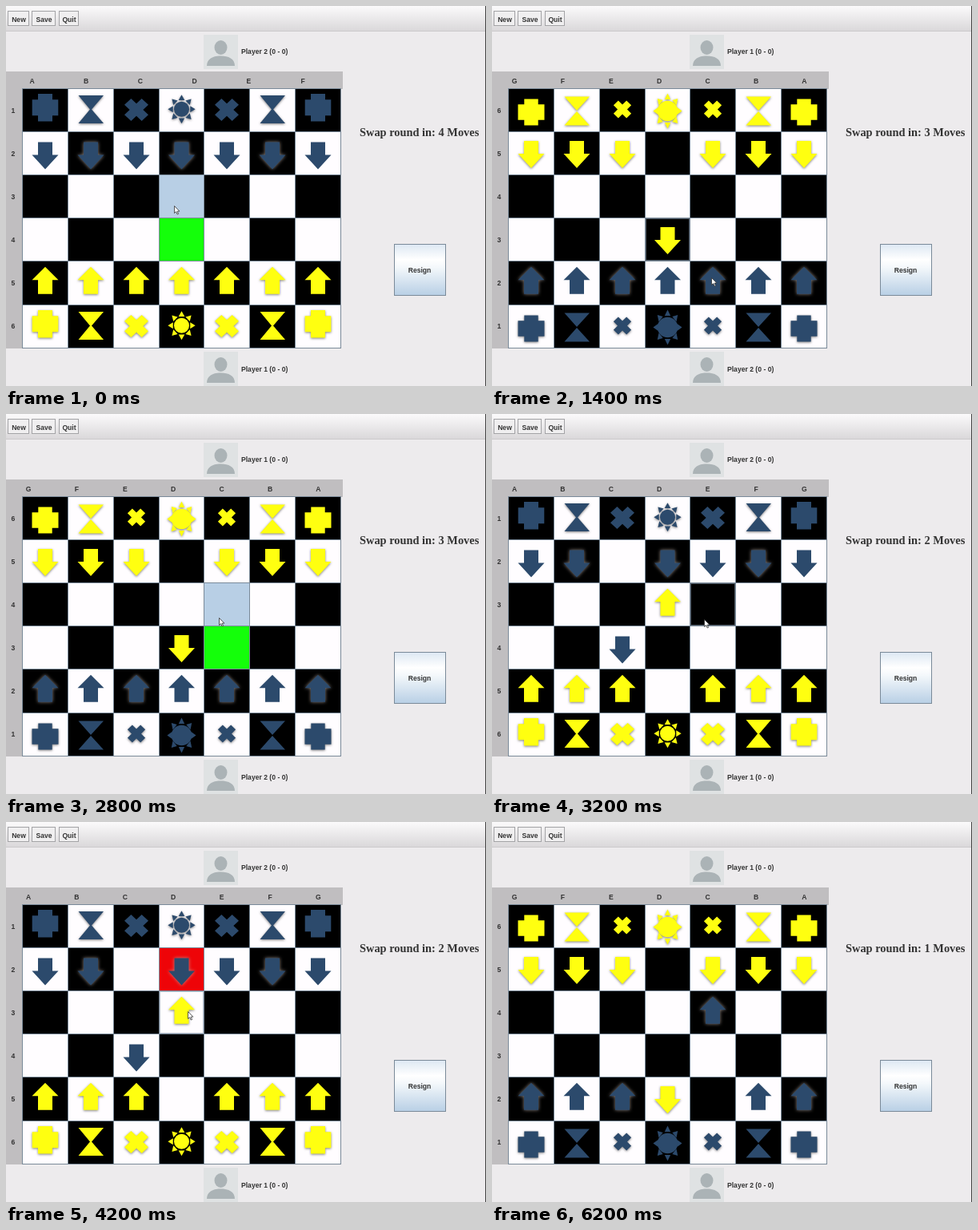
Recreate the animation shown at these times as an HTML page. Size 600 by 476 pixels, loop 6300 ms.

```html
<!DOCTYPE html>
<html lang="en">
<head>
<meta charset="utf-8">
<style>
html, body { margin: 0; width: 100%; height: 100%; overflow: hidden; background: #edebed; }
svg { display: block; }
text { font: bold 8.6px "Liberation Sans", Arial, sans-serif; fill: #333; }
.mid { text-anchor: middle; }
.swap { font: bold 14.4px "Liberation Serif", Times, serif; }
.blue { fill: #2c4a6c; }
.yellow { fill: #ffff10; }
.shade { filter: drop-shadow(0 1.5px 1.5px rgba(0,0,0,.5)); }
.halo { filter: drop-shadow(0 0 2px rgba(190,175,165,.75)); }
</style>
</head>
<body>
<svg width="600" height="476" viewBox="0 0 600 476">
  <defs>
    <linearGradient id="bar" x2="0" y2="1"><stop stop-color="#fbfafb"/><stop offset="1" stop-color="#dad8da"/></linearGradient>
    <linearGradient id="steel" x2="0" y2="1"><stop stop-color="#dde8f3"/><stop offset=".3" stop-color="#fff"/><stop offset=".45" stop-color="#f4f8fb"/><stop offset="1" stop-color="#b8cfe5"/></linearGradient>
    <g id="avatar">
      <rect width="43" height="43" fill="#dfe2e3"/>
      <ellipse cx="21.5" cy="16" rx="8" ry="9" fill="#abb3b6"/>
      <path d="M4 39C4 30 12 26.5 21.5 26.5S39 30 39 39Z" fill="#abb3b6"/>
    </g>
  </defs>
  <rect width="600" height="31" fill="url(#bar)"/>
  <path d="M0 31.5H600" stroke="#cccacc"/>
  <g id="tools"></g>
  <use href="#avatar" x="247" y="36"/>
  <use href="#avatar" x="247" y="433"/>
  <path d="M0 82H421V104H20V429H0Z" fill="#c0bec0"/>
  <rect x="485.5" y="298.5" width="64" height="64" fill="url(#steel)" stroke="#7a8a99"/>
  <text class="mid" x="517" y="334">Resign</text>
  <path d="M599.5 0V476" stroke="#444"/>
  <g id="scene"></g>
  <path id="cursor" d="M.5 .5V9.5L2.6 7.6L4.2 11L5.6 10.4L4.1 7.1H6.9Z" fill="#fff" stroke="#333" stroke-width=".8"/>
</svg>
<script>
const $ = id => document.getElementById(id);
const LOOP = 6300;
const START = "PHXSXHP" + "AAAAAAA" + ".".repeat(14) + "aaaaaaa" + "phxsxhp";
const MOVES = [[31, 17], [9, 23], [17, 10]];
const FILL = { green: "#14ff0a", red: "#ee0408", press: "#b8cfe5" };

// Board phases; cells are [row, column] on screen
const PHASES = [
  { at: 0, moves: 0, green: [[3, 3]], press: [[2, 3]] },
  { at: 200, moves: 1, focus: [3, 3] },
  { at: 1500, moves: 1, focus: [4, 4], green: [[3, 4], [2, 4]] },
  { at: 2100, moves: 1, green: [[3, 4]], press: [[2, 4]] },
  { at: 2900, moves: 2, focus: [2, 4] },
  { at: 4000, moves: 2, focus: [2, 3], red: [[1, 3]] },
  { at: 5100, moves: 2, press: [[1, 3]] },
  { at: 5300, moves: 3 }
];
// Pointer stops: time, x, y
const STOPS = [[0, 210, 250], [200, 210, 250], [600, 221, 276], [1300, 274, 340], [1600, 274, 340],
  [2100, 266, 255], [2900, 266, 255], [3200, 265, 257], [3900, 227, 237], [4300, 227, 237],
  [5000, 228, 181], [5400, 228, 181], [5800, 440, 210]];

const edgeX = c => 20.5 + Math.round(c * 398 / 7);
const edgeY = r => 103.5 + Math.round(r * 54.11);
const text = (x, y, s, cls = "") => `<text class="${cls}" x="${x}" y="${y}">${s}</text>`;
const plus = (x, y, w, h) =>
  `M${-w} ${-y}H${w}V${-h}H${x}V${h}H${w}V${y}H${-w}V${h}H${-x}V${-h}H${-w}Z`;

function sun(radius, inner, tip, base, squeeze) {
  let rays = "";
  for (let i = 0; i < 8; i++)
    rays += `<path transform="scale(${squeeze} 1) rotate(${i * 45})" d="M${-base} ${-inner}H${base}L0 ${-tip}Z"/>`;
  return `<circle r="${radius}"/>${rays}`;
}

// Shapes are centred on the column; the flipped view has its own piece set
function shape(kind, flipped, up) {
  const path = (d, y, extra = "") => `<path transform="translate(0 ${y})${extra}" d="${d}"/>`;
  switch (kind) {
    case "A": return up
      ? path("M0 0L16.5 16.5H9V34H-9V16.5H-16.5Z", 7.2)
      : path("M-9 0H9V16H16.5L0 34L-16.5 16H-9Z", flipped ? 11.5 : 13);
    case "P": return flipped
      ? path(plus(16.5, 16.5, 8.7, 9.7), 29.5)
      : path(plus(16.3, 17.3, 9, 10), 23.7);
    case "H": return flipped
      ? path("M-15.5 0H16L0 17.5ZM-15.5 36H16L0 18.5Z", 10)
      : path("M-15.5 0H16L1 17.5L16 35H-15.5L-1 17.5Z", 8.5);
    case "X": return flipped
      ? path(plus(11.5, 11.5, 4.2, 4.2), 26, "rotate(45)")
      : path(plus(15.3, 15.3, 5.9, 5.9), 26.5, "scale(1 .93)rotate(45)");
    case "S": return flipped
      ? `<g transform="translate(0 28)">${sun(12.8, 14.5, 22, 4.5, .82)}</g>`
      : `<g transform="translate(0 25.7)">${sun(9.5, 11.3, 18, 4, .95)}</g>`;
  }
}

function draw(phase) {
  const flipped = phase.moves % 2 === 1;
  const cells = [...START];
  for (const [from, to] of MOVES.slice(0, phase.moves)) {
    cells[to] = cells[from];
    cells[from] = ".";
  }
  if (flipped) cells.reverse();

  const names = [..."ABCDEFG"].slice(0, phase.moves ? 7 : 6);
  if (flipped) names.reverse();
  const [left, pitch] = phase.moves ? [28, 60.4] : [32.5, 67.7];
  let out = names.map((n, i) => text(left + pitch * i, 97, n, "mid")).join("");
  for (let r = 0; r < 6; r++) out += text(9, 134 + 54 * r, flipped ? 6 - r : r + 1, "mid");

  cells.forEach((piece, i) => {
    const r = Math.floor(i / 7), c = i % 7, x = edgeX(c), y = edgeY(r);
    const w = edgeX(c + 1) - x, h = edgeY(r + 1) - y;
    const mark = Object.keys(FILL).find(k => phase[k]?.some(p => p[0] === r && p[1] === c));
    const black = (r + c) % 2 === 0;
    const fill = FILL[mark] || (black ? "#000" : "#fffdff");
    out += `<rect x="${x}" y="${y}" width="${w}" height="${h}" fill="${fill}" stroke="#7a8a99"/>`;
    if (phase.focus && phase.focus[0] === r && phase.focus[1] === c)
      out += `<rect x="${x + 1}" y="${y + 1}" width="${w - 2}" height="${h - 2}" fill="none" stroke="#8b9cad" stroke-opacity=".6"/>`;
    if (piece === ".") return;
    const kind = piece.toUpperCase(), blue = piece === kind;
    const glow = !blue || kind !== "A" ? "shade" : black || mark === "red" ? "halo" : "";
    out += `<g class="${blue ? "blue" : "yellow"} ${glow}" transform="translate(${x + w / 2} ${y})">`
      + shape(kind, flipped, blue === flipped) + "</g>";
  });

  out += text(294, 60, `Player ${flipped ? 1 : 2} (0 - 0)`);
  out += text(294, 457.5, `Player ${flipped ? 2 : 1} (0 - 0)`);
  out += text(442, 163, `Swap round in: ${4 - phase.moves} Moves`, "swap");
  $("scene").innerHTML = out;
}

function movePointer(t) {
  const next = STOPS.findIndex(s => s[0] > t);
  $("cursor").style.display = next < 0 ? "none" : "";
  if (next < 0) return;
  const [t0, x0, y0] = STOPS[next - 1], [t1, x1, y1] = STOPS[next];
  const k = (t - t0) / (t1 - t0), e = k * k * (3 - 2 * k);
  $("cursor").setAttribute("transform", `translate(${x0 + (x1 - x0) * e} ${y0 + (y1 - y0) * e})`);
}

$("tools").innerHTML = [["New", 2, 26], ["Save", 32, 29], ["Quit", 66, 24]].map(([label, x, w]) =>
  `<rect x="${x + .5}" y="6.5" width="${w}" height="18" fill="#f0eff0" stroke="#a3a3a6"/>`
  + text(x + w / 2 + 1, 19.5, label, "mid")).join("");

let shown;
function tick() {
  const t = Math.floor(performance.now() % LOOP / 100) * 100;
  const phase = PHASES.findLast(p => p.at <= t);
  if (phase !== shown) draw(shown = phase);
  movePointer(t);
  requestAnimationFrame(tick);
}
tick();
</script>
</body>
</html>
```
